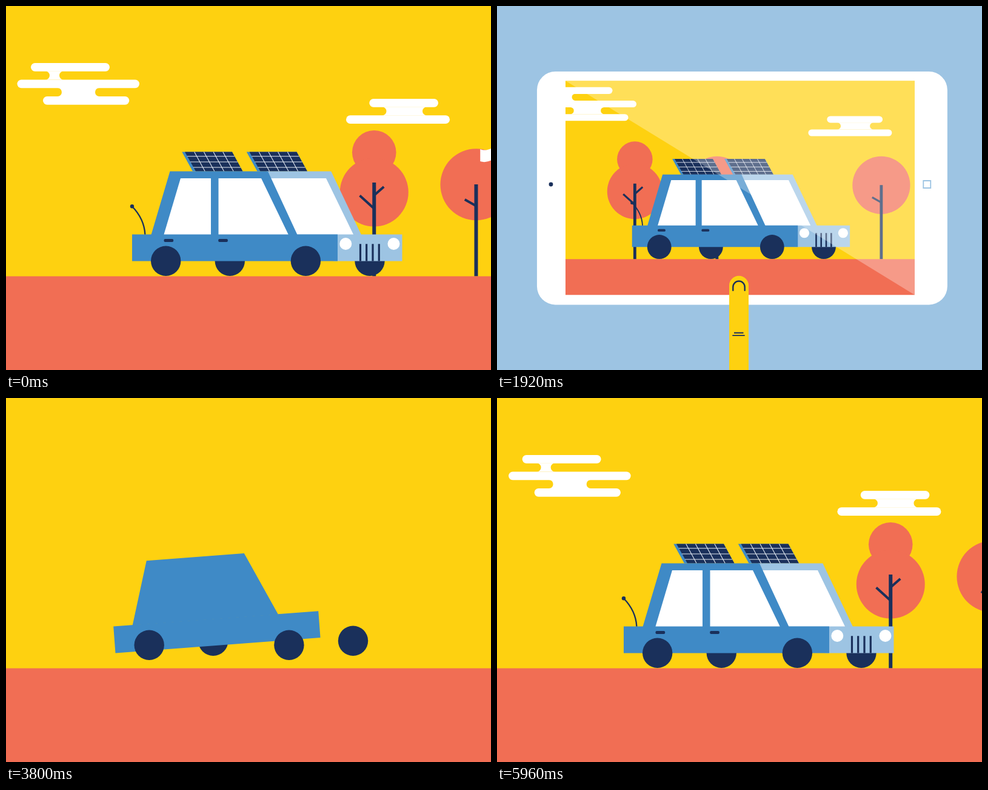
Write an HTML page with a canvas that moves like this. It is 800 by 600 pixels and loops after 6 s.

```html
<!DOCTYPE html>
<html lang="en">
<head>
<meta charset="utf-8">
<title>Solar car</title>
<style>
html, body { margin: 0; width: 100%; height: 100%; overflow: hidden; background: #fed110; }
canvas { display: block; width: 800px; height: 600px; }
</style>
</head>
<body>
<canvas id="stage" width="800" height="600"></canvas>
<script>
const LOOP = 6000, WIPE_START = 1940, WIPE_END = 2760;
const YELLOW = '#fed110', RED = '#f16e54', BLUE = '#3f8ac6';
const LIGHT = '#9dc4e3', NAVY = '#1a305b', WHITE = '#fff';
const ctx = document.getElementById('stage').getContext('2d');

// Smooth curve through [time, value] points that never overshoots them.
function track(t, pts) {
  const n = pts.length - 1;
  if (t <= pts[0][0]) return pts[0][1];
  if (t >= pts[n][0]) return pts[n][1];
  let i = 0;
  while (t > pts[i + 1][0]) i++;
  const rate = k => (pts[k + 1][1] - pts[k][1]) / (pts[k + 1][0] - pts[k][0]);
  const slope = k => {
    if (k === 0 || k === n) return 0;
    const a = rate(k - 1), b = rate(k);
    return a * b <= 0 ? 0 : 2 * a * b / (a + b);
  };
  const [t0, v0] = pts[i], [t1, v1] = pts[i + 1];
  const d = t1 - t0, p = (t - t0) / d, q = 1 - p;
  return v0 * (1 + 2 * p) * q * q + slope(i) * d * p * q * q
    + v1 * p * p * (3 - 2 * p) - slope(i + 1) * d * p * p * q;
}
const grow = (t, from, to) => track(t, [[from, 0], [to, 1]]);

function fill(color, path) {
  ctx.fillStyle = color;
  ctx.fill(path, 'evenodd');
}
function poly(color, ...xy) {
  const p = new Path2D();
  for (let i = 0; i < xy.length; i += 2) p.lineTo(xy[i], xy[i + 1]);
  p.closePath();
  fill(color, p);
}
function rect(color, x, y, w, h, r = 0) {
  const p = new Path2D();
  p.roundRect(x, y, w, h, r);
  fill(color, p);
}
function disc(color, x, y, r) {
  const p = new Path2D();
  p.arc(x, y, r, 0, 7);
  fill(color, p);
}
function stroke(color, width, d, cap = 'butt') {
  ctx.strokeStyle = color;
  ctx.lineWidth = width;
  ctx.lineCap = cap;
  ctx.stroke(new Path2D(d));
}
function group(draw) {
  ctx.save();
  draw();
  ctx.restore();
}
function scaleAt(x, y, sx, sy = sx) {
  ctx.translate(x, y);
  ctx.scale(sx, sy);
  ctx.translate(-x, -y);
}

// Clouds are pills joined by pieces with hollow ends.
const bar = (x0, x1, y) => rect(WHITE, x0, y, x1 - x0, 13.7, 6.85);
const joint = (x0, x1, y) => fill(WHITE, new Path2D(
  `M${x0 - 6.8} ${y - .2}a6.8 7 0 0 1 0 14H${x1 + 6.8}a6.8 7 0 0 1 0 -14Z`));

function clouds(t, u) {
  const drift = Math.max(u, -1160);
  const drop = u < 0 ? track(t, [[4000, -200], [4160, -85], [4480, 0]]) : 0;
  group(() => {
    ctx.translate(-.016 * drift, drop);
    bar(41, 171, 94);
    joint(72, 88, 107.7);
    bar(18.5, 220, 121.5);
    joint(92, 147, 135.2);
    bar(61, 203.3, 149);
  });
  group(() => {
    ctx.translate(-.0106 * drift, drop * 1.3);
    bar(599.3, 713, 153);
    joint(627.5, 687, 166.6);
    bar(561, 732, 180.3);
  });
}

const TREES = {
  double() {
    disc(RED, 0, 241.3, 36.3);
    disc(RED, 0, 307, 56.5);
    stroke(NAVY, 6, 'M0 291V445.5');
    stroke(NAVY, 4, 'M0 334L-23.7 312.5M0 312L16 298');
  },
  single() {
    disc(RED, 0, 294.3, 59);
    stroke(NAVY, 6, 'M0 294V445.5');
    stroke(NAVY, 4, 'M0 329.5L-18.7 319');
  },
  blue() {
    disc(LIGHT, 0, 310.5, 54);
    stroke(NAVY, 6, 'M0 315.5V445.5');
    stroke(NAVY, 4, 'M0 343L15 332');
  }
};
const PLANTED = [
  [-401, 'single'], [-232, 'blue'], [608.3, 'double'], [776.5, 'single'],
  [2203, 'double'], [2371, 'single'], [2707, 'single'], [2875, 'blue']
];
const FLAGS = [[-714, 322], [784, 245], [1215, 322], [1656, 245], [2685, 245]];
const FLAG = new Path2D(
  'M0-9C12-4 18-13 28-12Q35-12 41.5-8V11Q35 7 28 8C18 7 12 15 0 11Z');

function passing(u) {
  for (const [x, kind] of PLANTED) group(() => {
    ctx.translate(x - 1.05 * u, 0);
    TREES[kind]();
  });
  for (const [x, y] of FLAGS) group(() => {
    ctx.translate(x - 1.75 * u, y);
    fill(WHITE, FLAG);
  });
}

function panel(dx) {
  group(() => {
    ctx.translate(dx, 0);
    poly(BLUE, 290.3, 240.6, 373, 240.6, 390.5, 272.5, 308, 272.5);
    poly(NAVY, 295, 240.6, 373, 240.6, 390.5, 272.5, 313, 272.5);
    let grid = '';
    for (let i = 1; i < 5; i++) grid += `M${295 + i * 15.7} 240.6l17.5 31.9`;
    for (const y of [247.7, 257, 266]) {
      const lean = (y - 240.6) * .55;
      grid += `M${295 + lean} ${y}H${373 + lean}`;
    }
    stroke('#e3e9f2', 1.1, grid);
  });
}

function sparks(t, x, delay) {
  const p = (t - 4760 - delay) / 440;
  if (p <= 0 || p >= 1) return;
  const out = 1 - (1 - p) ** 3;
  const size = Math.sin(Math.PI * p);
  for (const side of [-1, 0, 1]) group(() => {
    ctx.translate(x + side * 25.5 * out, 240 - (side ? 36.5 : 42) * out);
    ctx.rotate(side * .75);
    scaleAt(0, 0, .25 + size);
    rect(WHITE, -1.9, -3, 3.8, 6, 1.6);
  });
}

function wheel(x, lift) {
  disc(NAVY, x, 420.3 + lift, 24.7);
}

function car(t, u) {
  const building = u < 0;
  const step = (from, to) => building ? grow(t, from, to) : 1;
  const rise = [[3040, 230], [3280, -47], [3460, 0], [3700, 0]];
  const hop = (h, end) => building ? track(t, [...rise, [3800, h], [end, 0]]) : 0;
  const near = hop(-13, 3920), far = hop(-20, 3940);
  const fall = building ? track(t, [[3540, -430], [3720, 0]]) : 0;
  const tilt = building
    ? track(t, [[3560, 3], [3700, -1], [3800, -4.3], [3960, 1.2], [4080, 0]]) : 0;
  const hood = step(3880, 4080), glass = step(3960, 4160);
  const panels = step(3780, 4280), aerial = step(4200, 4400);

  ctx.translate(track(u, [
    [-2100, -27.5], [-1160, 11.5], [-840, 11], [-40, 1], [0, 0],
    [680, -16.5], [1480, -26], [2280, -28.5], [2760, -29]
  ]), 0);
  wheel(369.3, far);
  wheel(600, far);

  group(() => {
    ctx.translate(208, 420.5 + fall);
    ctx.rotate(tilt * Math.PI / 180);
    ctx.translate(-208, -420.5);
    if (panels > 0) group(() => {
      scaleAt(365, 272.5, panels);
      panel(0);
      panel(106.5);
    });
    if (hood > 0) group(() => {
      scaleAt(480, 420.5, hood, 1);
      poly(LIGHT, 430, 272.5, 536.3, 272.5, 586, 377, 478, 377);
      rect(LIGHT, 540, 376.5, 113.5, 44);
      poly(WHITE, 437, 284, 528, 284, 573, 376.5, 480, 376.5);
      disc(WHITE, 560.3, 392, 10);
      disc(WHITE, 639.5, 392, 10);
      stroke(NAVY, 3.2, 'M584.5 392.2V420.5M594.7 392.2V420.5M605 392.2V420.5M615.3 392.2V420.5');
    });
    rect(BLUE, 208, 376.5, 339, 44);
    poly(BLUE, 239.5, 377, 270.5, 272.5, 432, 272.5, 480.5, 377);
    if (glass > 0) group(() => {
      scaleAt(350, 376.5, 1, glass);
      poly(WHITE, 288, 284, 338, 284, 338, 376.5, 260.5, 376.5);
      poly(WHITE, 350.5, 284, 421, 284, 465.7, 376.5, 350.5, 376.5);
      rect(NAVY, 260.5, 384, 15.7, 5, 2);
      rect(NAVY, 350.2, 384, 15.7, 5, 2);
    });
    if (aerial > 0) group(() => {
      scaleAt(229.5, 376.5, aerial);
      stroke(NAVY, 2.3, 'M229.4 376.5Q228 351 208 330.3');
      disc(NAVY, 208, 330.3, 3.2);
    });
  });
  wheel(263.7, near);
  wheel(494.4, near);
  if (building) {
    sparks(t, 332, 0);
    sparks(t, 439.5, -30);
  }
}

function scene(t, u) {
  const ground = u < 0 ? track(t, [[2900, 600], [3200, 445.5]]) : 445.5;
  clouds(t, u);
  group(() => passing(u));
  rect(RED, -200, ground, 1200, 400);
  group(() => car(t, u));
}

function tablet(t) {
  const size = track(t, [
    [0, 2.1], [200, 1.65], [400, 1.377], [640, 1.192], [680, 1.168],
    [1280, 1.02], [1480, 1], [2280, .97], [2760, .965]
  ]);
  group(() => {
    scaleAt(400, 300, size);
    ctx.globalAlpha = .3 * grow(t, 200, 600);
    poly(WHITE, 107, 119.5, 695, 119.5, 695, 480);
    ctx.globalAlpha = 1;
    const backdrop = new Path2D();
    backdrop.rect(-1000, -1000, 2800, 2600);
    backdrop.roundRect(60, 105, 689, 390, 30);
    fill(LIGHT, backdrop);
    const shell = new Path2D();
    shell.roundRect(59, 104, 691, 392.4, 31);
    shell.rect(107, 119.5, 588, 360.5);
    fill(WHITE, shell);
    disc(NAVY, 82.5, 293.9, 3.5);
    stroke(LIGHT, 1.9, 'M709.6 287.8h12.2v12.2h-12.2Z');
  });
}

function finger(t) {
  const top = track(t, [
    [1120, 610], [1400, 447], [1480, 445], [1600, 444],
    [1720, 452], [1860, 444], [1960, 446], [2240, 620]
  ]);
  group(() => {
    ctx.translate(399, top);
    rect(YELLOW, -16, 0, 32, 300, [16, 16, 0, 0]);
    stroke(NAVY, 2.4, 'M-9.7 24V18.5a9.7 9.7 0 0 1 19.4 0V24', 'round');
    stroke(NAVY, 1.8, 'M-8 94H7.5M-10.7 98.4H9.7');
  });
}

function wipe(t) {
  const p = (t - WIPE_START) / (WIPE_END - WIPE_START);
  if (p <= 0) return;
  const angle = 2 * Math.PI * (1 - (1 - p) ** 2.5);
  const p2d = new Path2D();
  p2d.moveTo(400, 300);
  p2d.arc(400, 300, 600, -Math.PI / 2, -Math.PI / 2 - angle, true);
  p2d.closePath();
  fill(YELLOW, p2d);
}

function draw(t) {
  const onTablet = t < WIPE_END;
  const u = onTablet ? t : t - LOOP;
  rect(YELLOW, 0, 0, 800, 600);
  group(() => {
    if (onTablet) scaleAt(400, 300, track(t, [
      [0, 1], [480, 1], [680, .965], [1280, .837], [1480, .8187], [2280, .801], [2760, .797]
    ]));
    scene(t, u);
  });
  if (onTablet) {
    tablet(t);
    finger(t);
    wipe(t);
  }
}

function tick() {
  draw(performance.now() % LOOP);
  requestAnimationFrame(tick);
}
tick();
</script>
</body>
</html>
```
